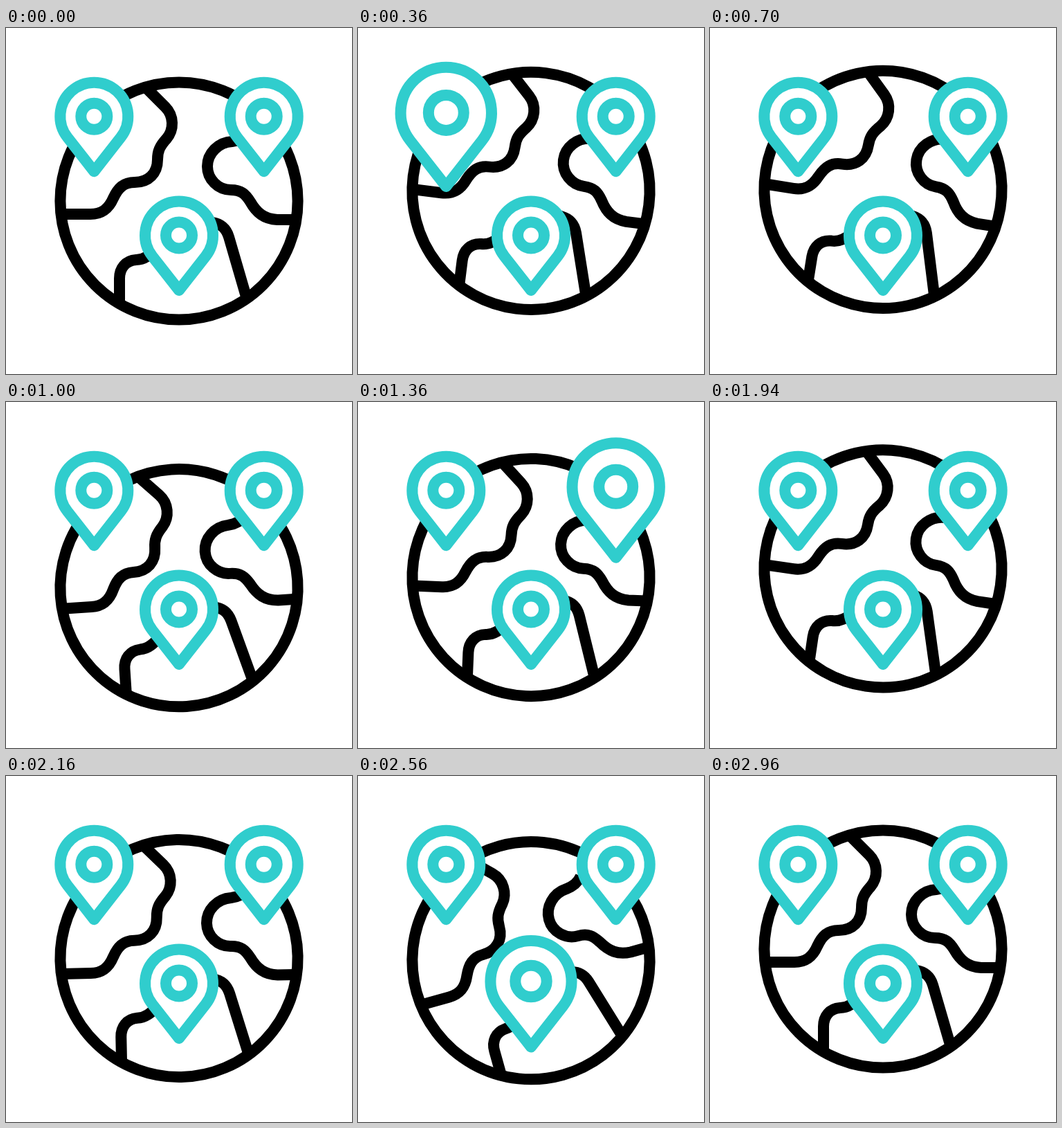
Recreate the animation shown at these times as an HTML page. Size 500x500 px, loop 3000 ms.

```html
<!DOCTYPE html>
<html lang="en">
<head>
<meta charset="utf-8">
<title>Globe with pins</title>
<style>
  html, body { margin: 0; width: 100%; height: 100%; overflow: hidden; background: #fff; }
  svg { display: block; width: 100vw; height: 100vh; }
  path, circle { stroke-width: 16; stroke-linejoin: round; vector-effect: non-scaling-stroke; }
  #globe { fill: none; stroke: #000; }
  .pin { fill: #fff; stroke: #30cdcd; }
</style>
</head>
<body>
<svg viewBox="0 0 500 500">
  <defs>
    <g id="shape">
      <path d="M0 79.5L-38.6 30.2A49 49 0 1 1 38.6 30.2Z"/>
      <circle r="19"/>
    </g>
  </defs>
  <g id="globe">
    <circle cx="250" cy="250" r="171.6"/>
    <path d="M204 88L230 114C243 127 243 147 232 160C222 171 219 178 219 190C219 210 206 223 186 223C170 223 162 231 155 246C148 262 138 269 122 269H80"/>
    <path d="M352 152C345 160 338 163 327 164C307 165 291 181 291 200C291 219 307 234 325 234C340 234 346 240 353 251C362 267 373 276 392 277H418"/>
    <path d="M164 398V362C164 347 173 336 188 335C200 335 208 328 218 318"/>
    <path d="M288 280L298 281C311 283 318 289 322 302L347 388"/>
  </g>
  <g class="pin"><use href="#shape"/></g>
  <g class="pin"><use href="#shape"/></g>
  <g class="pin"><use href="#shape"/></g>
</svg>
<script>
  const LOOP = 3000, STEP = 20;
  const PEAK = 1.39;
  const MID = 15.5; // scaling centre below the ring centre

  // Each track is a list of [time, value] keys, eased in and out.
  const lift = [[100, 0], [560, -24.5], [1100, 23], [1690, -24.3], [2350, 23], [2960, 0]];
  const turn = [[100, 0], [560, 12], [1100, -5.3], [1690, 13.4], [2640, -16.2], [2960, 0]];
  const still = [[0, 0]];
  const pop = (start, top, end) => [[start, 1], [top, PEAK], [end, 1]];

  const pins = [
    { x: 127.3, y: 127.7, size: pop(100, 435, 610), rise: still },
    { x: 372.7, y: 127.7, size: pop(1100, 1490, 1690), rise: [[1180, 0], [1680, -3], [1900, 0]] },
    { x: 250, y: 299.5, size: pop(2360, 2760, 2960), rise: still }
  ];

  const globe = document.getElementById("globe");
  document.querySelectorAll(".pin").forEach((node, i) => pins[i].node = node);

  function valueAt(track, t) {
    const next = track.findIndex(key => key[0] > t);
    if (next === 0) return track[0][1];
    if (next < 0) return track[track.length - 1][1];
    const [t0, a] = track[next - 1], [t1, b] = track[next];
    const p = (t - t0) / (t1 - t0);
    return a + (b - a) * p * p * (3 - 2 * p);
  }

  function draw(t) {
    globe.setAttribute("transform",
      `translate(0 ${valueAt(lift, t)}) rotate(${valueAt(turn, t)} 250 250)`);
    for (const pin of pins) {
      const y = pin.y + MID + valueAt(pin.rise, t);
      pin.node.setAttribute("transform",
        `translate(${pin.x} ${y}) scale(${valueAt(pin.size, t)}) translate(0 ${-MID})`);
    }
  }

  const begin = performance.now();
  function tick() {
    const t = (performance.now() - begin) % LOOP;
    draw(Math.floor(t / STEP) * STEP);
    requestAnimationFrame(tick);
  }
  tick();
</script>
</body>
</html>
```
